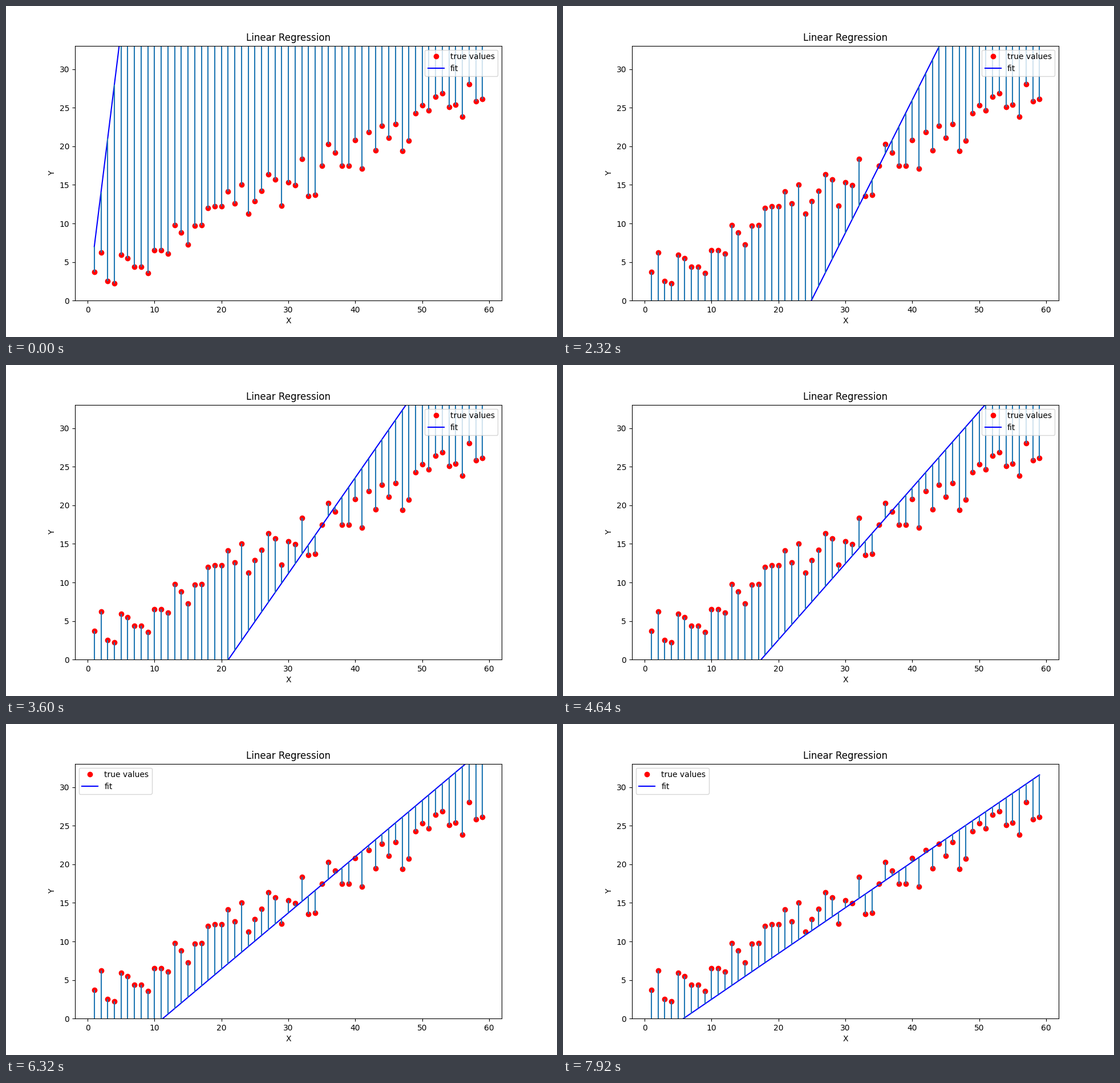
These frames come from a looping animation (966x580 px, 8 s). A matplotlib script:

```python
import numpy as np
import matplotlib.pyplot as plt
from matplotlib.animation import FuncAnimation

FRAMES, INTERVAL = 100, 80
SLOPE_RATE, BIAS_RATE = 0.0001, 0.1

x = np.arange(1, 60)
y = np.array([
    3.68, 6.20, 2.50, 2.27, 5.94, 5.49, 4.35, 4.35, 3.57, 6.49,
    6.49, 6.05, 9.79, 8.79, 7.27, 9.72, 9.79, 12.01, 12.20, 12.20,
    14.16, 12.57, 15.01, 11.27, 12.86, 14.23, 16.38, 15.68, 12.27, 15.31,
    14.94, 18.38, 13.57, 13.68, 17.45, 20.30, 19.16, 17.45, 17.49, 20.79,
    17.08, 21.82, 19.49, 22.67, 21.08, 22.90, 19.38, 20.75, 24.30, 25.34,
    24.67, 26.45, 26.89, 25.12, 25.38, 23.82, 28.04, 25.82, 26.12,
])


def gradient_descent(slope, bias, steps):
    """Return the (slope, bias) pair before each update of the squared error."""
    history = []
    for _ in range(steps):
        history.append((slope, bias))
        error = slope * x + bias - y
        slope -= SLOPE_RATE * 2 * np.mean(error * x)
        bias -= BIAS_RATE * 2 * np.mean(error)
    return history


history = gradient_descent(7.0, 0.0, FRAMES)

fig, ax = plt.subplots(figsize=(9.66, 5.8), dpi=100)
fig.subplots_adjust(left=0.125, right=0.9, bottom=0.11, top=0.88)
ax.set(title="Linear Regression", xlabel="X", ylabel="Y",
       xlim=(-1.9, 61.9), ylim=(0, y.max() + 5))

ax.plot(x, y, "ro", label="true values")
fit_line, = ax.plot(x, y, "b-", label="fit")
residuals = ax.vlines(x, y, y, colors="C0", linewidth=1.5)
# "best" moves the legend to the left once the fit reaches its corner.
ax.legend(loc="best")


def update(frame):
    slope, bias = history[frame]
    fit = slope * x + bias
    fit_line.set_ydata(fit)
    residuals.set_segments([[(px, py), (px, pf)] for px, py, pf in zip(x, y, fit)])
    return fit_line, residuals


animation = FuncAnimation(fig, update, frames=FRAMES, interval=INTERVAL,
                          init_func=lambda: update(0), repeat=True, repeat_delay=0)
plt.show()
```
